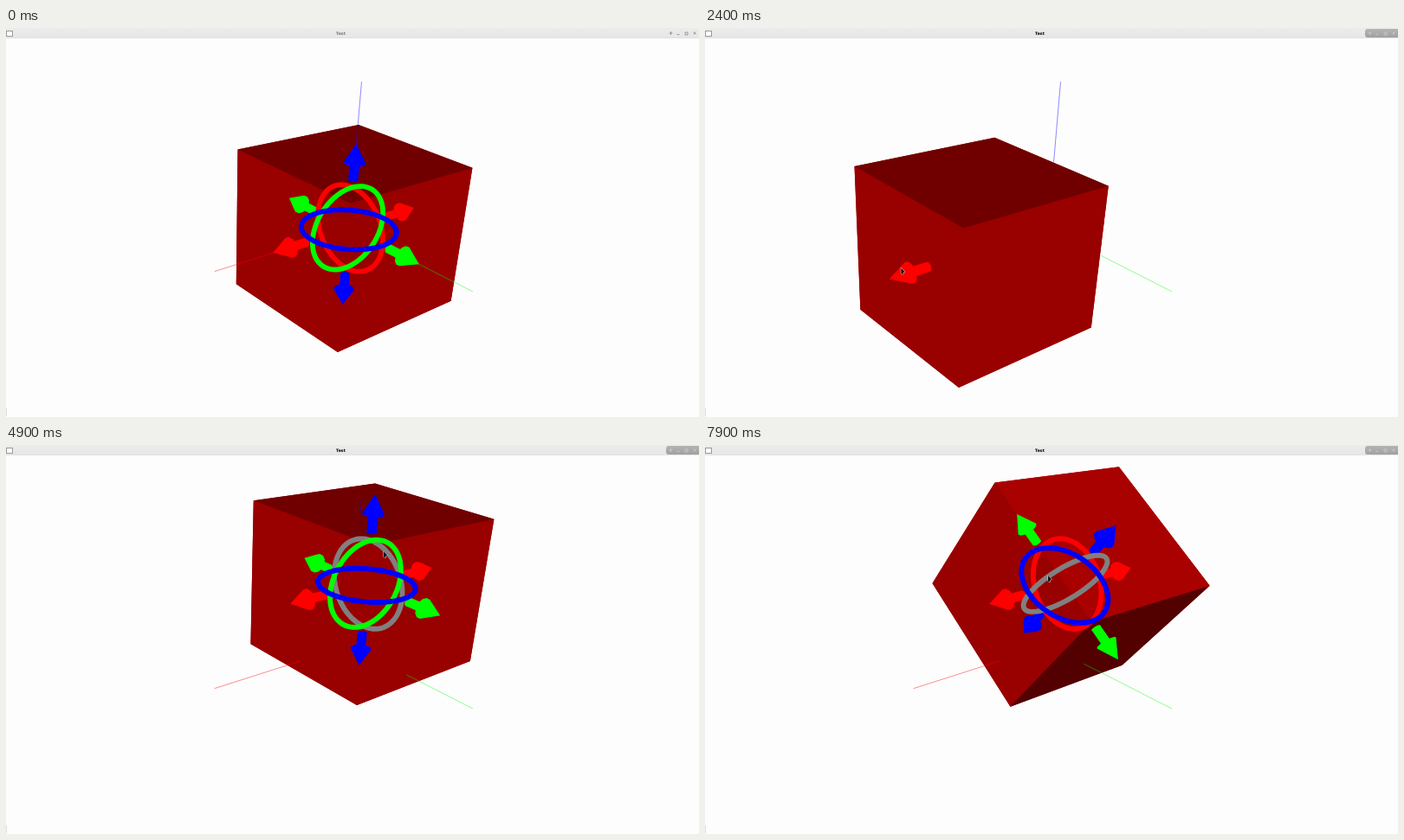
An HTML page with a canvas for the animation above (8 s loop, 800 by 450 pixels).

```html
<!DOCTYPE html>
<html lang="en">
<head>
<meta charset="utf-8">
<title>Test</title>
<style>
  html, body { margin: 0; width: 100%; height: 100%; overflow: hidden; background: #fefdfe; }
  #stage { position: absolute; left: 0; top: 0; width: 800px; height: 450px; overflow: hidden; }
  canvas { position: absolute; left: 0; top: 0; width: 800px; height: 450px; }
  #bar { position: absolute; left: 0; top: 0; width: 800px; height: 12px;
         background: linear-gradient(#ececec, #e6e6e6 90%, #dedede); }
  #title { position: absolute; left: 336.5px; width: 100px; top: 0; text-align: center;
           font: bold 4.7px/13px "DejaVu Sans", sans-serif; color: #777; }
  #icon { position: absolute; left: 0; top: 3px; width: 6px; height: 5px;
          background: #fff; border: 1px solid #999; }
  #buttons { position: absolute; left: 762px; top: 1px; width: 40px; height: 10px;
             border-radius: 3px; color: #888; }
  #buttons svg { position: absolute; left: 0; top: 0; }
  .focus #title { color: #000; }
  .focus #buttons { background: linear-gradient(#b4b4b4, #a0a0a0); color: #ccc; }
  #corner { position: absolute; left: 0; top: 440px; width: 1px; height: 9px; background: #ddd; }
</style>
</head>
<body>
<div id="stage">
  <canvas id="view"></canvas>
  <div id="bar">
    <div id="icon"></div>
    <div id="title">Test</div>
    <div id="buttons">
      <svg width="38" height="10" fill="none" stroke="currentColor" stroke-width="0.8">
        <path d="M3.5 5h4M5.5 3v4M12.5 6.5h3M22 4h3v3h-3zM31.5 3.500l3 3M34.5 3.500l-3 3"/>
      </svg>
    </div>
  </div>
  <div id="corner"></div>
</div>
<script>
const LOOP = 8000, FRAME = 100, FOCUS_AT = 1100;
const stage = document.getElementById('stage');
const canvas = document.getElementById('view');
const ctx = canvas.getContext('2d');
const ratio = window.devicePixelRatio || 1;
canvas.width = 800 * ratio;
canvas.height = 450 * ratio;
ctx.scale(ratio, ratio);

// Camera: right, down and forward directions, and the place of the world origin
const RIGHT = [-0.7316, 0.6781, 0.0736];
const DOWN = [0.2439, 0.361, -0.8997];
const FORWARD = [-0.6368, -0.6406, -0.4295];
const ORIGIN = [-0.036, 0.087, 9.65];
const FOCAL = [886, 833], CENTRE = [399.3, 224.5];

const AXES = [0, 1, 2], SIDES = [1, -1];
const COLORS = ['#f00', '#0f0', '#00f'];
const HOVER = '#808080';

// Pointer place and box pose; each step eases the values it names
const REST = { x: 533, y: 97, slide: 0, lift: 0, turn: 0 };
const STEPS = [
  { from: 100, to: 600, x: 163, y: 345 },
  { from: 600, to: 1000, x: 327, y: 235, hover: 'x+' },
  { from: 1150, to: 2100, x: 204, y: 287, slide: 1.35, hold: 'x+' },
  { from: 2200, to: 3000, x: 347, y: 226, slide: -0.215, hold: 'x+' },
  { from: 3150, to: 3500, x: 426, y: 143, hover: 'z+' },
  { from: 3700, to: 4480, x: 434, y: 65, lift: 0.834, hold: 'z+' },
  { from: 4500, to: 4900, x: 436, y: 123, hover: 'ring0' },
  { from: 5200, to: 5600, x: 405, y: 112, hover: 'ring0' },
  { from: 6000, to: 6530, x: 440, y: 126, turn: 0.614, hold: 'ring0' },
  { from: 7200, to: 7900, x: 396, y: 151, hover: 'ring1' }
];

const dot = (a, b) => a[0] * b[0] + a[1] * b[1] + a[2] * b[2];
const add = (a, b) => a.map((v, i) => v + b[i]);
const axisPoint = (axis, d) => AXES.map(i => i === axis ? d : 0);
const smooth = f => f * f * (3 - 2 * f);

const EYE = AXES.map(i =>
  -(ORIGIN[0] * RIGHT[i] + ORIGIN[1] * DOWN[i] + ORIGIN[2] * FORWARD[i]));

function stateAt(t) {
  const state = { ...REST };
  for (const step of STEPS) {
    if (t < step.from) break;
    const f = Math.min(1, (t - step.from) / (step.to - step.from));
    for (const key in REST) {
      if (key in step) state[key] += (step[key] - state[key]) * smooth(f);
    }
    state.hold = step.hold;
    state.hover = f > 0.5 ? step.hover : null;
  }
  return state;
}

const depth = p => dot(FORWARD, p) + ORIGIN[2];

function project(p) {
  const d = depth(p);
  return [CENTRE[0] + FOCAL[0] * (dot(RIGHT, p) + ORIGIN[0]) / d,
          CENTRE[1] + FOCAL[1] * (dot(DOWN, p) + ORIGIN[1]) / d];
}

function rotate(p, angle) {
  const c = Math.cos(angle), s = Math.sin(angle);
  return [p[0], p[1] * c + p[2] * s, p[2] * c - p[1] * s];
}

function makePose({ slide, lift, turn }) {
  const pos = [slide, 0, lift];
  return {
    turn,
    toWorld: p => add(rotate(p, turn), pos),
    toLocal: p => rotate(add(p, pos.map(v => -v)), -turn),
    toScreen(p) { return project(this.toWorld(p)); }
  };
}

function trace(points) {
  ctx.beginPath();
  points.forEach(p => ctx.lineTo(p[0], p[1]));
  ctx.closePath();
}

function fillShape(points, color) {
  trace(points);
  ctx.fillStyle = color;
  ctx.fill();
}

function hull(points) {
  const sorted = points.slice().sort((a, b) => a[0] - b[0] || a[1] - b[1]);
  const half = list => {
    const out = [];
    for (const p of list) {
      while (out.length > 1) {
        const a = out[out.length - 2], b = out[out.length - 1];
        if ((b[0] - a[0]) * (p[1] - a[1]) - (b[1] - a[1]) * (p[0] - a[0]) > 0) break;
        out.pop();
      }
      out.push(p);
    }
    return out.slice(0, -1);
  };
  return half(sorted).concat(half(sorted.reverse()));
}

function circle(axis, offset, radius, count) {
  return Array.from({ length: count }, (_, n) => {
    const a = (n + 0.5) * 2 * Math.PI / count, p = axisPoint(axis, offset);
    p[(axis + 1) % 3] = radius * Math.cos(a);
    p[(axis + 2) % 3] = radius * Math.sin(a);
    return p;
  });
}

function drawBox(pose) {
  const eye = pose.toLocal(EYE);
  const faces = AXES.filter(axis => Math.abs(eye[axis]) > 1).map(axis => {
    const side = Math.sign(eye[axis]);
    const normal = rotate(axisPoint(axis, side), pose.turn);
    const light = Math.ceil(28 + 195 * Math.max(0, -dot(normal, FORWARD)));
    const corners = circle(axis, side, Math.SQRT2, 4).map(p => pose.toScreen(p));
    return { corners, color: `rgb(${light},0,0)` };
  });
  // A backing under the faces keeps the seams closed
  fillShape(hull(faces.flatMap(face => face.corners)), faces[0].color);
  faces.forEach(face => fillShape(face.corners, face.color));
}

// True when the box lies between the eye and the point
function hidden(eye, p) {
  let near = 0, far = 0.9995;
  for (const i of AXES) {
    const d = p[i] - eye[i];
    const a = (-1 - eye[i]) / d, b = (1 - eye[i]) / d;
    near = Math.max(near, Math.min(a, b));
    far = Math.min(far, Math.max(a, b));
  }
  return near < far;
}

function drawAxes(pose) {
  const eye = pose.toLocal(EYE), count = 240;
  ctx.lineWidth = 0.5;
  for (const axis of AXES) {
    ctx.strokeStyle = COLORS[axis];
    ctx.beginPath();
    let open = false;
    for (let n = 0; n <= count; n++) {
      const p = axisPoint(axis, 2 * n / count);
      const seen = !hidden(eye, pose.toLocal(p));
      if (seen) ctx[open ? 'lineTo' : 'moveTo'](...project(p));
      open = seen;
    }
    ctx.stroke();
  }
}

function drawArrow(axis, side, color, pose) {
  const disc = (offset, radius) =>
    circle(axis, side * offset, radius, 12).map(p => pose.toScreen(p));
  const tip = pose.toScreen(axisPoint(axis, side * 1.2));
  fillShape(hull([...disc(0.7, 0.06), ...disc(0.95, 0.06)]), color);
  fillShape(hull([...disc(0.94, 0.135), tip]), color);
}

function drawRing(axis, color, pose) {
  trace(circle(axis, 0, 0.6, 72).map(p => pose.toScreen(p)));
  ctx.lineWidth = 56 / depth(pose.toWorld([0, 0, 0]));
  ctx.strokeStyle = color;
  ctx.stroke();
}

function drawHandles(pose, { hold, hover }) {
  const show = (id, axis, draw) => {
    if (!hold || hold === id) draw(hover === id ? HOVER : COLORS[axis]);
  };
  for (const axis of AXES) {
    for (const side of SIDES) {
      show('xyz'[axis] + (side > 0 ? '+' : '-'), axis,
        color => drawArrow(axis, side, color, pose));
    }
  }
  for (const axis of AXES) {
    show('ring' + axis, axis, color => drawRing(axis, color, pose));
  }
}

function drawPointer({ x, y }) {
  trace([[x, y], [x, y + 6.5], [x + 2.5, y + 7.5], [x + 2.5, y + 5], [x + 4.5, y + 4.5]]);
  ctx.lineWidth = 1;
  ctx.strokeStyle = '#ddd';
  ctx.stroke();
  ctx.fillStyle = '#111';
  ctx.fill();
}

function render(t) {
  const state = stateAt(t), pose = makePose(state);
  ctx.clearRect(0, 0, 800, 450);
  drawBox(pose);
  drawAxes(pose);
  drawHandles(pose, state);
  if (t >= STEPS[0].from) drawPointer(state);
  stage.classList.toggle('focus', t >= FOCUS_AT);
}

const start = performance.now();
function tick() {
  const t = (performance.now() - start) % LOOP;
  render(Math.floor(t / FRAME) * FRAME);
  requestAnimationFrame(tick);
}
tick();
</script>
</body>
</html>
```
